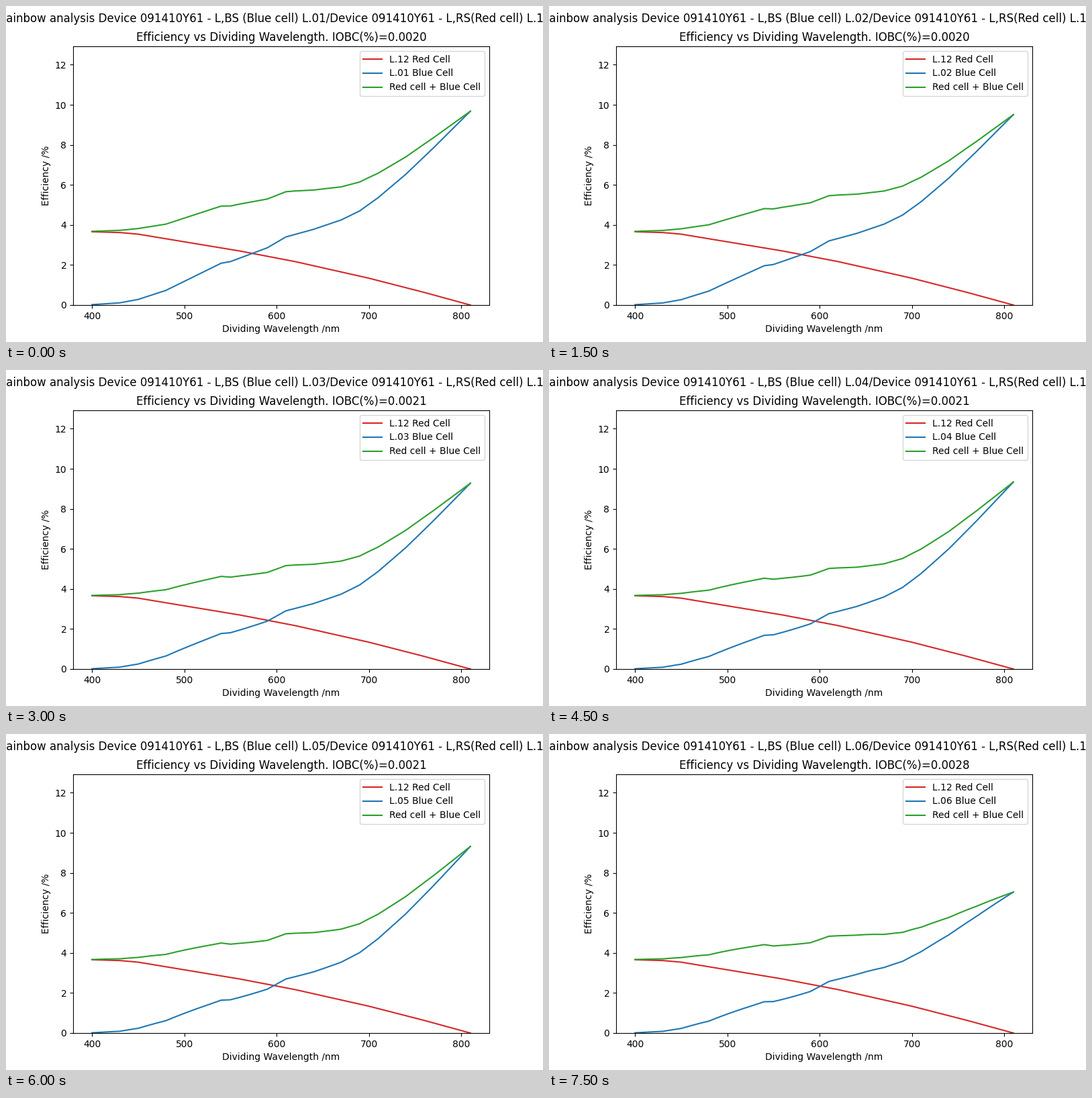
Recreate the animation shown at these times as a matplotlib script. Size 800x500 px, loop 8000 ms.

```python
import numpy as np
import matplotlib.pyplot as plt
from matplotlib.animation import FuncAnimation

plt.rcParams["font.family"] = "DejaVu Sans"

STEP_MS = 500
STEPS = 16
STEPS_PER_CELL = 3

# Key points of the red cell and the first blue cell: (nm, %)
RED_KEYS = [(400, 3.66), (430, 3.62), (450, 3.54), (480, 3.31), (560, 2.70),
            (620, 2.17), (700, 1.34), (760, 0.63), (810, 0.00)]
BLUE_KEYS = [(400, 0.02), (430, 0.11), (450, 0.28), (480, 0.73), (540, 2.09),
             (550, 2.17), (590, 2.86), (610, 3.40), (640, 3.78), (670, 4.25),
             (690, 4.70), (710, 5.36), (740, 6.53), (770, 7.85), (810, 9.68)]

# Per blue cell: loss at mid wavelengths, extra loss at the end, IOBC
CELLS = [(0.00, 0.00, 0.0020), (0.21, -0.04, 0.0020), (0.52, -0.12, 0.0021),
         (0.67, -0.33, 0.0021), (0.74, -0.38, 0.0021), (0.87, 1.77, 0.0028)]

wavelength = np.arange(400, 811, 10)


def through(keys):
    return np.interp(wavelength, *zip(*keys))


red = through(RED_KEYS)
base = through(BLUE_KEYS)
rise = 1 / (1 + np.exp((528 - wavelength) / 28))
tail = np.clip((wavelength - 640) / 170, 0, 1) ** 1.6


def blue_curve(mid_loss, end_loss):
    return np.maximum(base - mid_loss * rise - end_loss * tail, 0)


fig, ax = plt.subplots(figsize=(8, 5), dpi=100)
heading = fig.suptitle("")
ax.set_xlabel("Dividing Wavelength /nm")
ax.set_ylabel("Efficiency /%")
ax.set_xlim(379.5, 830.5)
ax.set_ylim(0, 12.92)

ax.plot(wavelength, red, color="tab:red", label="L.12 Red Cell")
blue_line, = ax.plot(wavelength, base, color="tab:blue",
                     label="L.01 Blue Cell")
sum_line, = ax.plot(wavelength, red + base, color="tab:green",
                    label="Red cell + Blue Cell")
legend = ax.legend(loc="upper right")


def update(step):
    cell = step // STEPS_PER_CELL
    mid_loss, end_loss, iobc = CELLS[cell]
    name = f"L.{cell + 1:02d}"
    blue = blue_curve(mid_loss, end_loss)
    blue_line.set_ydata(blue)
    sum_line.set_ydata(red + blue)
    legend.get_texts()[1].set_text(f"{name} Blue Cell")
    heading.set_text(f"Rainbow analysis Device 091410Y61 - L,BS (Blue cell) "
                     f"{name}/Device 091410Y61 - L,RS(Red cell) L.12")
    ax.set_title(f"Efficiency vs Dividing Wavelength. IOBC(%)={iobc:.4f}")
    return blue_line, sum_line


anim = FuncAnimation(fig, update, frames=STEPS, interval=STEP_MS,
                     init_func=lambda: update(0), repeat=True,
                     repeat_delay=0, blit=False)
plt.show()
```
